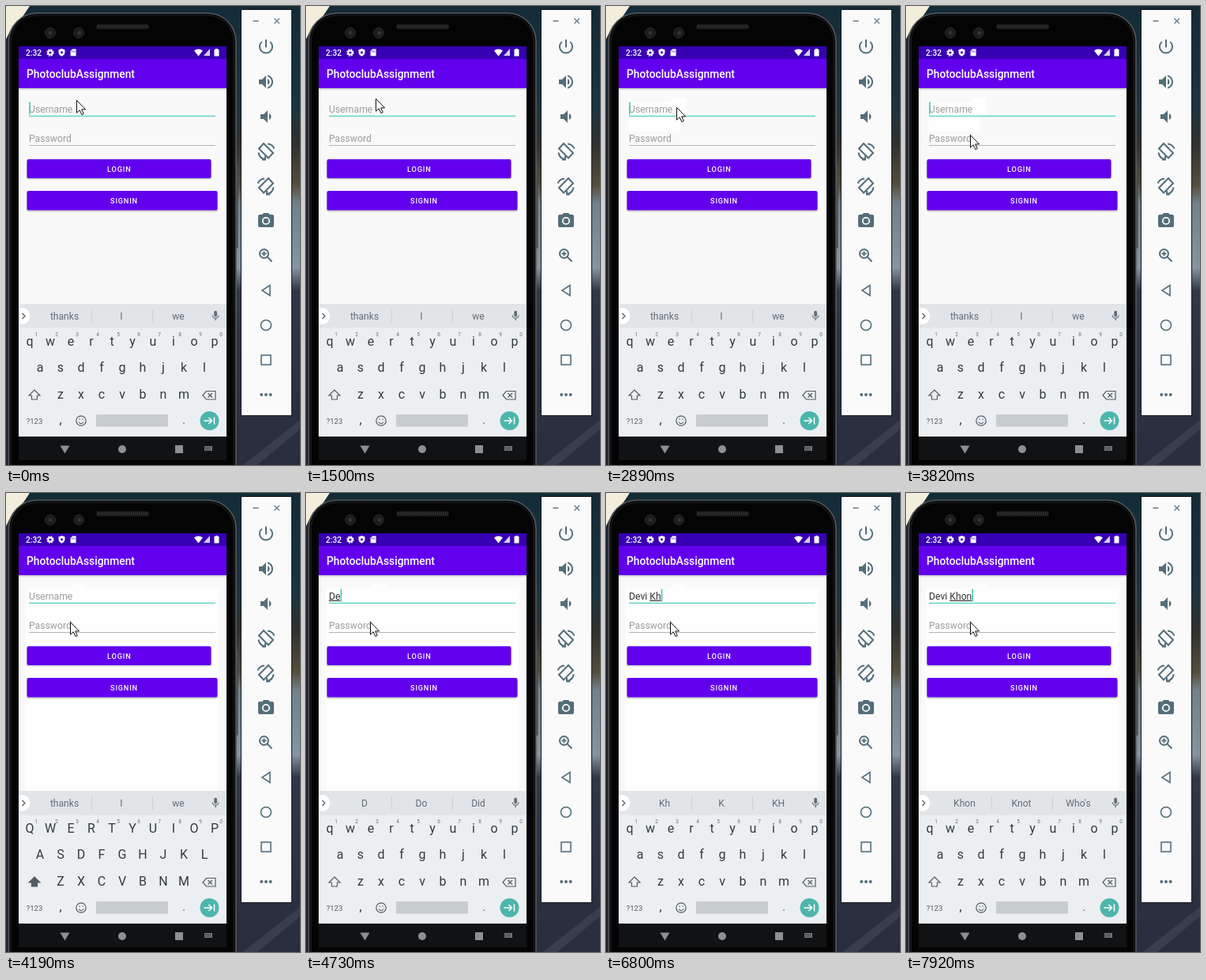
These frames come from a looping animation (372x581 px, 8 s). An HTML page:

```html
<!DOCTYPE html>
<html lang="en">
<head>
<meta charset="utf-8">
<title>Login form on a phone</title>
<style>
  html, body { margin: 0; width: 100%; height: 100%; overflow: hidden; background: #1d222e; }
  svg { display: block; width: 372px; height: 581px; }
  text { font-family: Roboto, sans-serif; white-space: pre; }
  .mid { text-anchor: middle; }
  .field { font-size: 12.2px; }
  .button { font-size: 9.2px; font-weight: 500; letter-spacing: .8px; fill: #fff; }
  .hint { fill: #9c9c9c; }
  .suggestion { font-size: 12.1px; fill: #626d74; }
  .key { font-size: 16px; fill: #303c43; }
  .digit { font-size: 6.5px; fill: #67737a; }
  .line { fill: none; stroke: #546e7a; stroke-width: 2; }
  .thin { fill: none; stroke: #515d64; stroke-width: 1.2; }
  .composing { text-decoration: underline; text-decoration-thickness: .8px; text-underline-offset: 1.5px; }
</style>
</head>
<body>
<svg viewBox="0 0 372 581">
  <defs>
    <linearGradient id="scenery" x2="0" y2="1">
      <stop offset="0" stop-color="#142b38"/>
      <stop offset=".22" stop-color="#1b3440"/>
      <stop offset=".3" stop-color="#30312f"/>
      <stop offset=".39" stop-color="#554e3c"/>
      <stop offset=".43" stop-color="#71818b"/>
      <stop offset=".57" stop-color="#8494a0"/>
      <stop offset=".62" stop-color="#303747"/>
      <stop offset="1" stop-color="#292e3e"/>
    </linearGradient>
    <linearGradient id="barShadow" x2="0" y2="1">
      <stop offset="0" stop-color="#000" stop-opacity=".22"/>
      <stop offset="1" stop-color="#000" stop-opacity="0"/>
    </linearGradient>
    <clipPath id="screen"><rect x="16" y="51" width="263" height="524"/></clipPath>
  </defs>

  <!-- Desktop -->
  <rect width="372" height="581" fill="url(#scenery)"/>
  <rect y="40" width="16" height="541" fill="#20242f"/>
  <path d="M0 0H30L22 12 8 26 0 42Z" fill="#f3eedb"/>
  <path d="M300 581L372 524V536L318 581Z" fill="#383e4d"/>

  <!-- Phone body -->
  <rect x="290" y="199" width="3.5" height="108" rx="1.5" fill="#4b4d50"/>
  <rect x="3.5" y="9" width="287.5" height="620" rx="36" fill="#0b0b0c" stroke="#55575a" stroke-width="1.6"/>
  <rect x="6.5" y="12" width="281.5" height="614" rx="33" fill="#040405" stroke="#1d1e20"/>
  <g fill="#1c1b1d" stroke="#29272a">
    <circle cx="56" cy="34" r="6.5"/><circle cx="92" cy="34" r="6.5"/>
  </g>
  <circle cx="56" cy="34" r="2.5" fill="#34313a"/><circle cx="93" cy="34" r="2.5" fill="#34313a"/>
  <rect x="114" y="23" width="67" height="6.5" rx="3" fill="#19191a"/>
  <path d="M116 26.2H180" stroke="#3b3b3c" stroke-width="4" stroke-dasharray="1 1.5"/>

  <!-- App -->
  <g clip-path="url(#screen)">
    <rect x="16" y="51" width="263" height="17" fill="#3700b3"/>
    <rect x="16" y="104" width="263" height="274" fill="#f9f9f9"/>
    <g id="repaints" fill="#fefefe">
      <path data-from="1620" d="M82 116h20v22h-20z"/>
      <path data-from="1770" d="M28 121h70v17h-4v21H28z"/>
      <path data-from="4190" d="M25 121h244v257H25z"/>
    </g>
    <rect x="16" y="67" width="263" height="37" fill="#6200ee"/>
    <rect x="16" y="104" width="263" height="3" fill="url(#barShadow)"/>
    <text x="25" y="62.8" fill="#fff" font-size="10.2" font-weight="500">2:32</text>
    <g fill="#fff">
      <circle cx="56" cy="59" r="2.6" fill="none" stroke="#fff" stroke-width="2"/>
      <circle cx="56" cy="59" r="4" fill="none" stroke="#fff" stroke-width="1.4" stroke-dasharray="1.8 1.34"/>
      <path d="M70.5 54l4 1.6v3c0 2.4-1.7 4.3-4 5.2-2.3-.9-4-2.8-4-5.2v-3z"/>
      <path d="M84 54.5h4.6v8.8h-7V57z"/>
      <path d="M238 56.5Q243.500 52.500 249 56.500L243.500 63.500Z"/>
      <path d="M258 54v9h-8z" opacity=".8"/>
      <path d="M265 54h3v1h1.500v8.500h-6V55h1.500z"/>
    </g>
    <circle cx="70.500" cy="58.800" r="1.500" fill="#3700b3"/>
    <path d="M83.500 56.500v2m1.700-2v2m1.700-2v2" stroke="#3700b3" stroke-width=".7"/>
    <text x="26" y="91" fill="#fff" font-size="13.8" font-weight="500">PhotoclubAssignment</text>

    <text id="hint" class="field hint" x="29" y="134.700">Username</text>
    <text class="field" x="29" y="134.700" fill="#353535"><tspan id="done"></tspan><tspan id="word" class="composing"></tspan></text>
    <rect x="29" y="138.600" width="236" height="1.600" fill="#6ad6c9"/>
    <rect id="caret" y="121.500" width="1.500" height="16" fill="#35c9b8"/>
    <text class="field hint" x="29" y="171.700">Password</text>
    <rect x="29" y="176" width="236" height="1" fill="#b5b5b5"/>

    <g fill="#000" opacity=".18">
      <rect x="26" y="195.500" width="234" height="24" rx="2"/>
      <rect x="26" y="235.500" width="242" height="25" rx="2"/>
    </g>
    <rect x="26.500" y="194" width="233" height="24" rx="2" fill="#6200ee"/>
    <rect x="26.500" y="234" width="241" height="24.500" rx="2" fill="#6200ee"/>
    <text class="button mid" x="143.300" y="209.600">LOGIN</text>
    <text class="button mid" x="149.500" y="249.800">SIGNIN</text>

    <!-- Keyboard -->
    <rect x="16" y="377" width="263" height="31" fill="#e1e5e8"/>
    <rect x="16" y="407.500" width="263" height="138" fill="#eceff1"/>
    <circle cx="20" cy="392.500" r="10.500" fill="#fff"/>
    <path d="M20.500 389l3.500 3.500-3.500 3.500" class="thin"/>
    <path d="M108.500 384v17M185.500 384v17" stroke="#cbd0d3"/>
    <g id="suggestions"></g>
    <path transform="translate(257.500 384.500) scale(.64)" fill="#626d74" d="M12 14c1.660 0 3-1.340 3-3V5c0-1.660-1.340-3-3-3S9 3.340 9 5v6c0 1.660 1.340 3 3 3zm5.300-3c0 3-2.540 5.100-5.300 5.100S6.700 14 6.700 11H5c0 3.410 2.720 6.230 6 6.720V21h2v-3.280c3.280-.48 6-3.300 6-6.720z"/>
    <g id="keys"></g>
    <path id="shift" class="thin" d="M36 486l7 7h-3.500v5h-7v-5H29z"/>
    <path class="thin" d="M253.500 487.500H265v10.500h-11.500l-4.500-5.250zM255.500 490l5.500 5.500m0-5.500l-5.500 5.500"/>
    <text class="mid" x="36" y="528.500" font-size="9.500" fill="#515d64">?123</text>
    <text class="key mid" x="69" y="528.500">,</text>
    <text class="key mid" x="225" y="528.500" opacity=".7">.</text>
    <circle class="thin" cx="95" cy="525" r="6.200"/>
    <path class="thin" d="M91.800 526.500q3.200 4.200 6.400 0M92.200 523h1.600m2.400 0h1.600"/>
    <rect x="114" y="517" width="91" height="15.500" rx="1" fill="#c7cccf"/>
    <circle cx="257.500" cy="525" r="12" fill="#4db6ac"/>
    <path d="M250.500 525h10m-4-4l4 4-4 4m7-8.500v9" fill="none" stroke="#fff" stroke-width="1.500"/>

    <!-- Navigation bar -->
    <rect x="16" y="545" width="263" height="30" fill="#111213"/>
    <g fill="#8d8f91">
      <path d="M68.500 556.500h12l-6 10z"/>
      <circle cx="147" cy="561" r="5"/>
      <rect x="214" y="556" width="10" height="10"/>
      <rect x="251" y="557" width="10" height="6" opacity=".8"/>
    </g>
    <path d="M252 559h8m-8 2h8" stroke="#111213" stroke-dasharray="1 1"/>
  </g>

  <!-- Emulator toolbar -->
  <rect x="297.500" y="4.500" width="64" height="514" fill="#fafafa" stroke="#15191f"/>
  <path d="M312.500 19h7M339.500 15.700l6.500 6.500m0-6.500l-6.500 6.500" fill="none" stroke="#607d8b" stroke-width="1.300"/>
  <g fill="#546e7a">
    <path transform="translate(317 39.500)" d="M13 3h-2v10h2V3zm4.830 2.170l-1.420 1.420C17.990 7.860 19 9.810 19 12c0 3.870-3.130 7-7 7s-7-3.130-7-7c0-2.190 1.010-4.140 2.580-5.420L6.170 5.170C4.230 6.820 3 9.260 3 12c0 4.970 4.030 9 9 9s9-4.030 9-9c0-2.740-1.230-5.180-3.170-6.830z"/>
    <path transform="translate(317 84)" d="M3 9v6h4l5 5V4L7 9H3zm13.500 3c0-1.770-1.020-3.290-2.500-4.030v8.050c1.480-.73 2.500-2.250 2.500-4.020zM14 3.230v2.060c2.890.86 5 3.540 5 6.710s-2.110 5.850-5 6.710v2.060c4.010-.91 7-4.490 7-8.770s-2.990-7.860-7-8.770z"/>
    <path transform="translate(317 128)" d="M18.500 12c0-1.770-1.020-3.290-2.500-4.030v8.050c1.480-.73 2.500-2.250 2.500-4.020zM5 9v6h4l5 5V4L9 9H5z"/>
    <path transform="translate(317 260)" d="M9 2L7.170 4H4c-1.100 0-2 .9-2 2v12c0 1.100.9 2 2 2h16c1.100 0 2-.9 2-2V6c0-1.100-.9-2-2-2h-3.170L15 2H9z"/>
    <circle cx="329" cy="272" r="4.200" fill="none" stroke="#fafafa" stroke-width="1.800"/>
    <circle cx="323.300" cy="492" r="2"/><circle cx="329" cy="492" r="2"/><circle cx="334.700" cy="492" r="2"/>
  </g>
  <g id="rotateIcon" class="line" stroke-width="1.700">
    <path d="M326 174l12 12-6 6.500-12-12zM319.500 185.500a10 10 0 0 0 8 8.500M331 174.500a10 10 0 0 1 8.500 6"/>
    <path d="M328 190v4.500h-4"/>
  </g>
  <use href="#rotateIcon" transform="matrix(-1 0 0 1 658 44)"/>
  <g class="line">
    <circle cx="326.500" cy="313.500" r="5.500"/>
    <path d="M330.500 317.500l6 6M323.500 313.500h6m-3-3v6" stroke-width="1.800"/>
    <path d="M334 353.500v13l-10-6.500z" stroke-width="1.600"/>
    <circle cx="329" cy="404" r="6.500" stroke-width="1.600"/>
    <rect x="323" y="442" width="12" height="12" stroke-width="1.600"/>
  </g>

  <path id="pointer" d="M.5.500V16.200L4.200 12.800 6.900 18.600 9.300 17.500 6.700 11.900H11.600Z" fill="#fff" stroke="#111"/>
</svg>

<script>
  const LOOP = 8000;
  const byId = id => document.getElementById(id);

  function addText(parent, className, x, y, content = '') {
    const node = document.createElementNS('http://www.w3.org/2000/svg', 'text');
    node.setAttribute('class', className + ' mid');
    node.setAttribute('x', x);
    node.setAttribute('y', y);
    node.textContent = content;
    return byId(parent).appendChild(node);
  }

  const slots = [74, 146, 218].map(x => addText('suggestions', 'suggestion', x, 397));

  const letterKeys = [];
  [['qwertyuiop', 30, 430], ['asdfghjkl', 43, 463], ['zxcvbnm', 69, 497]].forEach(([row, left, y], rowIndex) => {
    [...row].forEach((letter, i) => {
      const x = left + 26 * i;
      letterKeys.push({ letter, node: addText('keys', 'key', x, y) });
      if (rowIndex === 0) addText('keys', 'digit', x + 8.2, 418, (i + 1) % 10);
    });
  });

  // Each step holds until the next: [time, values...]
  const pointerSteps = [
    [0, 89, 119], [1500, 88, 117], [1620, 86, 122], [1770, 82, 140], [1890, 79, 130],
    [2010, 77, 120], [2130, 77, 122], [2250, 79, 125], [2370, 81, 127],
    [2770, 86, 128], [2890, 89, 128], [3030, 84, 150], [3160, 81, 163]
  ];
  const typingSteps = [
    [0, '', ''], [4330, '', 'D'], [4730, '', 'De'], [5240, '', 'Dev'], [5490, '', 'Devi'],
    [5870, 'Devi ', ''], [6660, 'Devi ', 'K'], [6800, 'Devi ', 'Kh'],
    [7370, 'Devi ', 'Kho'], [7920, 'Devi ', 'Khon']
  ];
  const suggestionSteps = [
    [0, 'thanks', 'I', 'we'], [4330, 'D', 'Do', 'Did'], [4850, 'De', 'Dear', 'Deal'],
    [5240, 'Dev', 'Devil', 'Device'], [5490, 'Devi', 'Devia', 'Devise'], [5870, 'and', 'is', 'the'],
    [6800, 'Kh', 'K', 'KH'], [7490, 'Kho', 'Who', 'Oh'], [7920, 'Khon', 'Knot', "Who's"]
  ];
  const caretHidden = [[370, 870], [1500, 1890], [2370, 2770], [3410, 3820], [4190, 4330], [6400, 6660]];

  const valuesAt = (steps, t) => steps.findLast(([start]) => start <= t).slice(1);
  const within = (t, [start, end]) => t >= start && t < end;
  const show = (node, visible) => node.setAttribute('visibility', visible ? 'visible' : 'hidden');

  function render(t) {
    byId('pointer').setAttribute('transform', `translate(${valuesAt(pointerSteps, t)})`);

    const [done, word] = valuesAt(typingSteps, t);
    byId('done').textContent = done;
    byId('word').textContent = word;
    show(byId('hint'), !(done + word));
    const typedWidth = (done + word) ? byId('done').parentNode.getComputedTextLength() : 0;
    byId('caret').setAttribute('x', 29.2 + typedWidth);
    show(byId('caret'), !caretHidden.some(span => within(t, span)));

    valuesAt(suggestionSteps, t).forEach((text, i) => slots[i].textContent = text);

    const upper = within(t, [4190, 4330]);
    letterKeys.forEach(({ letter, node }) => node.textContent = upper ? letter.toUpperCase() : letter);
    byId('shift').style.fill = upper ? '#515d64' : 'none';

    for (const patch of byId('repaints').children) show(patch, t >= +patch.dataset.from);
  }

  const startTime = performance.now();
  function frame() {
    render((performance.now() - startTime) % LOOP);
    requestAnimationFrame(frame);
  }
  render(0);
  requestAnimationFrame(frame);
</script>
</body>
</html>
```
